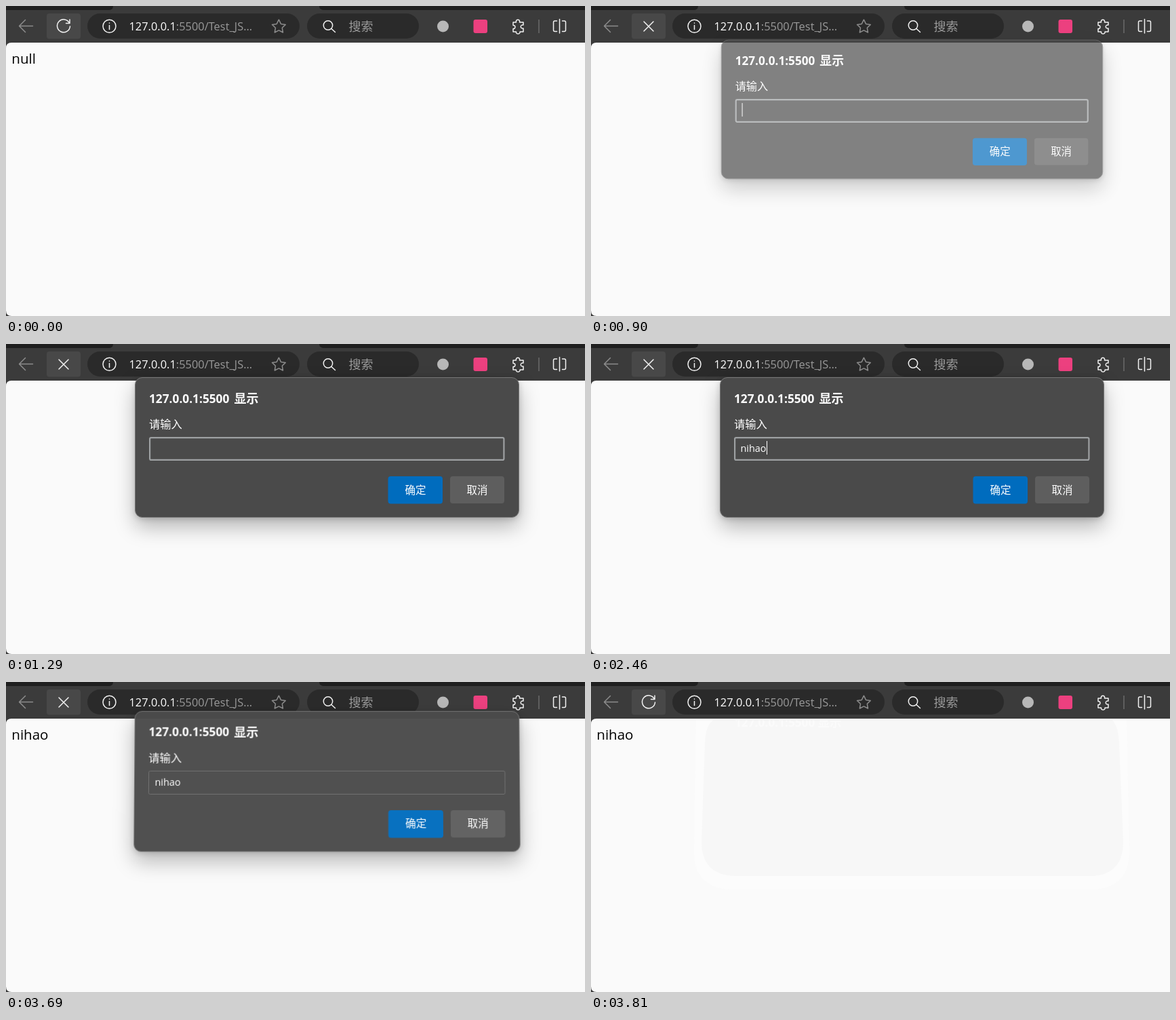
An HTML page that plays this animation: 854x457 px, repeating every 5100 ms.

```html
<!DOCTYPE html>
<html lang="zh">
<head>
<meta charset="utf-8">
<title>Prompt dialog</title>
<style>
html, body { margin: 0; width: 100%; height: 100%; overflow: hidden; background: #3b3b3b; }
svg { display: block; font-family: "Open Sans", "Noto Sans", "Noto Sans CJK SC", "Noto Sans CJK", sans-serif; }
#stage { position: absolute; left: 0; top: 0; width: 854px; height: 457px; overflow: hidden; }
#dialog {
  position: absolute; left: 190px; top: 49px; width: 567px; height: 207px;
  box-sizing: border-box; border: 1.5px solid #777; border-radius: 11px; background: #4a4a4a;
  box-shadow: 0 14px 30px rgba(0, 0, 0, .27), 0 2px 8px rgba(0, 0, 0, .16);
}
#dialog svg { position: absolute; left: -1.5px; top: -1.5px; }
.icon { fill: none; stroke: #f2f2f2; stroke-width: 1.5; stroke-linecap: round; stroke-linejoin: round; }
.dim { stroke: #8c8c8c; }
</style>
</head>
<body>
<div id="stage">
  <svg width="854" height="457" viewBox="0 0 854 457">
    <rect width="854" height="457" fill="#3b3b3b"/>
    <path d="M0 0H158Q158 6 151 6H0ZM462 0H854V6H470Q462 6 462 0Z" fill="#1f1f1f"/>

    <rect x="60" y="11" width="50" height="37.500" rx="4" fill="#484848"/>
    <rect x="120" y="11" width="313" height="37" rx="18.500" fill="#2a2a2a"/>
    <rect x="444" y="11" width="165" height="37" rx="18.500" fill="#2a2a2a"/>

    <path class="icon dim" d="M39.500 29.500H20M28.500 20.500L19.500 29.500L28.500 38.500"/>
    <path id="reload" class="icon" d="M93.500 25A9.500 9.500 0 1 0 94.500 30M94 20V25.500H88.500"/>
    <path id="stop" class="icon" d="M78 23L92 37M92 23L78 37"/>
    <g class="icon">
      <circle cx="152.500" cy="29.800" r="9.500"/>
      <path d="M152.500 28.500V34.500M152.500 25V25.200"/>
      <circle cx="475" cy="28.500" r="6.700"/>
      <path d="M480 33.500L485.500 38.500"/>
      <path d="M748 24H752.500C751 19 759 19 757.500 24H763V28C758 27 758 34 763 33V38H758C759 42 751.500 42 752.500 38H748V33.500C752 34 752 28 748 28.500Z"/>
      <path d="M816.500 19.500V40M812.500 22H809.500Q807.500 22 807.500 24V35.500Q807.500 37.500 809.500 37.500H812.500M820.500 22H823.500Q825.500 22 825.500 24V35.500Q825.500 37.500 823.500 37.500H820.500"/>
    </g>
    <path id="star" class="icon dim"/>
    <text x="181.500" y="36" font-size="16.400" fill="#9a9a9a"><tspan fill="#fff">127.0.0.1</tspan>:5500/Test_JS...</text>
    <text x="505.500" y="36.500" font-size="18" fill="#9a9a9a">搜索</text>
    <circle cx="644.500" cy="30" r="8.500" fill="#b8b8b8"/>
    <rect x="689.500" y="20" width="20.500" height="20" rx="3" fill="#ec407f"/>
    <path d="M786 20V40" stroke="#6b6b6b" stroke-width="1.500"/>

    <path d="M854 54H8Q0 54 0 62V449Q0 457 8 457H854Z" fill="#fafafa"/>
    <g id="trace">
      <path d="M155 55L152 250Q152 306 212 306H734Q794 306 794 250L790 55Z" fill="#fcfcfc"/>
      <path d="M182 55Q169 62 168 90L163 235Q163 286 215 286H735Q785 286 785 235L779 90Q778 65 768 55Z" fill="#f7f7f7"/>
      <clipPath id="below"><path d="M0 55H854V457H0Z"/></clipPath>
      <text x="212" y="66" font-size="17.300" font-weight="700" fill="#fbfbfb" clip-path="url(#below)">127.0.0.1:5500 显示</text>
    </g>
    <text id="page" x="8.300" y="85" font-size="20.500" fill="#000"></text>
  </svg>

  <div id="dialog">
    <svg width="567" height="207" viewBox="190 49 567 207" fill="#fff">
      <text x="211" y="86.500" font-size="17.300" font-weight="700">127.0.0.1:5500</text>
      <text x="336.500" y="87" font-size="18" font-weight="700">显示</text>
      <text x="211" y="124" font-size="16.300">请输入</text>
      <rect id="field" fill="none"/>
      <text id="typed" x="220.500" y="159" font-size="14.400"></text>
      <rect id="caret" y="143" width="1" height="20"/>
      <rect x="563.500" y="195" width="80.500" height="40.500" rx="4" fill="#006cbe"/>
      <rect x="655" y="195" width="80" height="40" rx="4" fill="#5e5e5e"/>
      <text x="588.500" y="220.500" font-size="15.500">确定</text>
      <text x="679.500" y="220.500" font-size="15.500">取消</text>
    </svg>
  </div>
</div>
<script>
const LOOP = 5100, STEP = 30;
const OPEN = 810, OPENED = 990, BLUR = 3420, CLOSE = 3540, CLOSED = 3810;
const KEYS = [[1710, 1], [1770, 2], [1980, 3], [2400, 4], [2460, 5]];
const WORD = "nihao";

const el = id => document.getElementById(id);
const show = (id, on) => { el(id).style.visibility = on ? "visible" : "hidden"; };
const setText = (id, s) => { if (el(id).textContent !== s) el(id).textContent = s; };
const within = (t, a, b) => t >= a && t < b;
const clamp = x => Math.min(1, Math.max(0, x));

el("star").setAttribute("d", "M" + Array.from({ length: 10 }, (_, i) => {
  const a = i * Math.PI / 5 - Math.PI / 2, r = i % 2 ? 5.2 : 10.4;
  return (402.4 + r * Math.cos(a)).toFixed(1) + " " + (30.6 + r * Math.sin(a)).toFixed(1);
}).join("L") + "Z");

function drawField(focused) {
  const w = focused ? 2.2 : 1, f = el("field");
  const box = { x: 211 + w / 2, y: 137 + w / 2, width: 524.5 - w, height: 35 - w, rx: 2,
    stroke: focused ? "#9da0a2" : "#6c6c6c", "stroke-width": w };
  for (const k in box) f.setAttribute(k, box[k]);
}

function drawDialog(t) {
  const d = el("dialog");
  const on = t > OPEN && t < CLOSED;
  d.style.display = on ? "block" : "none";
  if (!on) return;

  const left = 1 - clamp((t - OPEN) / (OPENED - OPEN));
  const out = clamp((t - CLOSE) / (CLOSED - CLOSE));
  const tilt = out * out;
  const scale = 1 - 0.1 * left ** 4 + 0.012 * tilt;
  d.style.opacity = (1 - left ** 1.67) * (1 - out ** 6);
  d.style.transform = out > 0
    ? `translateY(${-20 * tilt}px) perspective(1200px) rotateX(${6 * tilt}deg) scale(${scale})`
    : left > 0 ? `scale(${scale})` : "none";

  const count = KEYS.filter(k => t >= k[0]).length;
  setText("typed", WORD.slice(0, count));
  const width = count ? el("typed").getComputedTextLength() : 0;
  el("caret").setAttribute("x", Math.round(221 + width));
  el("caret").style.display = t < 1290 || within(t, 1710, 2970) ? "inline" : "none";
  drawField(t < BLUR);
}

function render(time) {
  const t = Math.floor((time % LOOP) / STEP) * STEP;
  const loading = within(t, OPEN, 3780);
  show("stop", loading);
  show("reload", !loading);
  show("trace", t >= CLOSED);
  setText("page", t < 840 ? "null" : t < 3570 ? "" : WORD);
  drawDialog(t);
}

const start = performance.now();
function tick() {
  render(performance.now() - start);
  requestAnimationFrame(tick);
}
tick();
</script>
</body>
</html>
```
